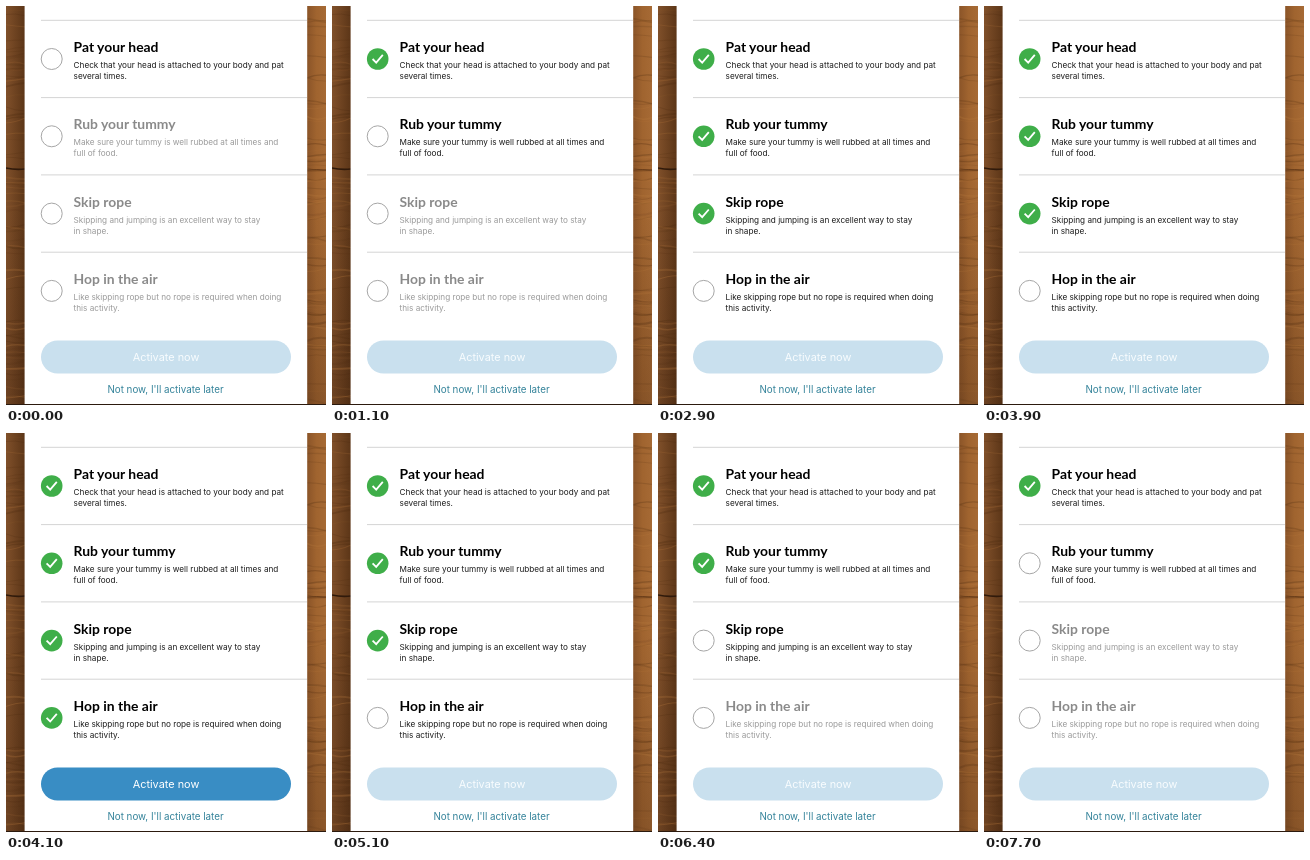
An HTML page that plays this animation: 320x399 px, repeating every 8000 ms.

```html
<!DOCTYPE html>
<html lang="en">
<head>
<meta charset="utf-8">
<title>Activity checklist</title>
<style>
  html, body { margin: 0; width: 100%; height: 100%; overflow: hidden; background: #7c4c22; }
  svg { display: block; width: 100%; height: 100%; }
  text { font-family: Inter, "Open Sans", sans-serif; }
  .title { font: 700 13.9px Lato, "Open Sans", sans-serif; fill: #8a8a8a; }
  .body { font-size: 8.19px; fill: #9a9a9a; }
  .open .title { fill: #000; }
  .open .body { fill: #1c1c1c; }
  .ring { fill: #fff; stroke: #a6a6a6; }
  .tick { visibility: hidden; }
  .done .tick { visibility: visible; }
  .done .ring { visibility: hidden; }
  .button { fill: #c9e0ee; }
  .label { font-size: 10.9px; fill: #f8fcfe; text-anchor: middle; }
  .ready .button { fill: #398dc4; }
  .ready .label { fill: #fff; }
  .link { font-size: 9.8px; fill: #34839a; text-anchor: middle; }
</style>
</head>
<body>
<svg viewBox="0 0 320 399" preserveAspectRatio="none">
  <defs>
    <linearGradient id="leftWood">
      <stop offset="0" stop-color="#80502a"/>
      <stop offset="1" stop-color="#5b3517"/>
    </linearGradient>
    <linearGradient id="rightWood">
      <stop offset="0" stop-color="#8a5428"/>
      <stop offset=".5" stop-color="#a0642f"/>
      <stop offset="1" stop-color="#a66a35"/>
    </linearGradient>
    <linearGradient id="depth" x2="0" y2="1">
      <stop offset=".5" stop-color="#2a1408" stop-opacity="0"/>
      <stop offset="1" stop-color="#2a1408" stop-opacity=".22"/>
    </linearGradient>
  </defs>
  <rect width="19" height="399" fill="url(#leftWood)"/>
  <rect x="301" width="19" height="399" fill="url(#rightWood)"/>
  <rect width="320" height="399" fill="url(#depth)"/>
  <g id="grain" fill="none"></g>
  <path d="M0 162Q9 164 19 163" fill="none" stroke="#301a0b" stroke-width="1.6"/>
  <path d="M301 164Q311 163 320 164" fill="none" stroke="#5a3315" opacity=".7"/>
  <rect y="398" width="320" height="1" fill="#2c1a0e"/>
  <rect x="18.6" width="282.6" height="398" fill="#fff"/>
  <g id="rows"></g>
  <g id="action">
    <rect class="button" x="35" y="334.5" width="250" height="33" rx="16.5"/>
    <text class="label" x="160" y="355">Activate now</text>
  </g>
  <text class="link" x="159.5" y="386.7">Not now, I'll activate later</text>
</svg>
<script>
  const LOOP = 8000, PITCH = 77.3;
  // [start in ms, number of checked rows]
  const STEPS = [[0, 0], [1000, 1], [2000, 2], [2900, 3], [4100, 4], [5000, 3], [6300, 2], [7300, 1]];
  const ACTIVITIES = [
    ["Pat your head", "Check that your head is attached to your body and pat", "several times."],
    ["Rub your tummy", "Make sure your tummy is well rubbed at all times and", "full of food."],
    ["Skip rope", "Skipping and jumping is an excellent way to stay", "in shape."],
    ["Hop in the air", "Like skipping rope but no rope is required when doing", "this activity."]
  ];
  const byId = id => document.getElementById(id);

  let seed = 11;
  const random = () => (seed = seed * 16807 % 2147483647) / 2147483647;

  function grainLine() {
    const x = random() < .5 ? 0 : 301, y = random() * 398;
    const bend = () => (y + random() * 5 - 2.5).toFixed(1);
    const color = random() < .6 ? "#4a290f" : "#b97a3e";
    return `<path d="M${x} ${bend()}Q${x + 9} ${bend()} ${x + 19} ${bend()}" stroke="${color}"
      stroke-width="${(.5 + random() * 1.5).toFixed(1)}" opacity="${(.1 + random() * .2).toFixed(2)}"/>`;
  }

  const rowMarkup = ([title, first, second], i) => `
    <g transform="translate(0 ${i * PITCH})">
      <path d="M35 14.3H301" stroke="#d4d4d4"/>
      <circle class="ring" cx="45.7" cy="53" r="10.5"/>
      <g class="tick">
        <circle cx="45.7" cy="53" r="10.8" fill="#3fae49"/>
        <path d="M40.6 53L44.2 56.6L50.8 48.9" fill="none" stroke="#fff" stroke-width="1.8"/>
      </g>
      <text class="title" x="67.6" y="46">${title}</text>
      <text class="body" x="67.6" y="62.2">${first}</text>
      <text class="body" x="67.6" y="73.2">${second}</text>
    </g>`;

  byId("grain").innerHTML = Array.from({ length: 130 }, grainLine).join("");
  byId("rows").innerHTML = ACTIVITIES.map(rowMarkup).join("");
  const rows = [...byId("rows").children];

  function draw() {
    const time = performance.now() % LOOP;
    const checked = STEPS.filter(([start]) => start <= time).pop()[1];
    rows.forEach((row, i) => {
      row.classList.toggle("done", i < checked);
      row.classList.toggle("open", i <= checked);
    });
    byId("action").classList.toggle("ready", checked === rows.length);
    requestAnimationFrame(draw);
  }
  draw();
</script>
</body>
</html>
```
